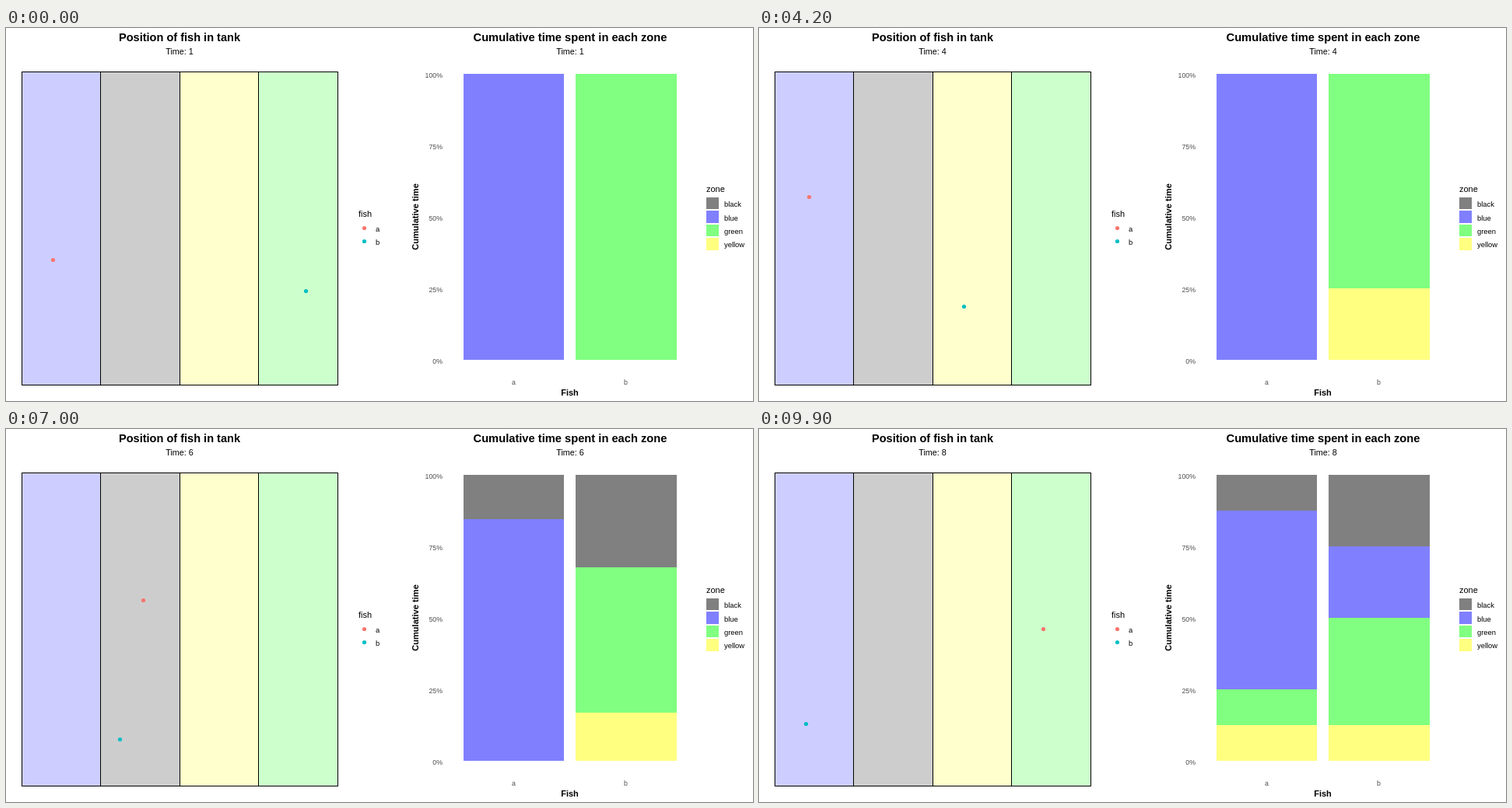
An HTML page for the animation above (10 s loop, 960 px wide and 480 px high).

```html
<!DOCTYPE html>
<html lang="en">
<head>
<meta charset="utf-8">
<title>Fish in tank</title>
<style>
  html, body { margin: 0; width: 100%; height: 100%; overflow: hidden; background: #fff; }
  svg { display: block; width: 960px; height: 480px; font-family: "Liberation Sans", Arial, sans-serif; }
  rect { shape-rendering: crispEdges; }
</style>
</head>
<body>
<svg id="stage" viewBox="0 0 960 480"></svg>
<script>
const STEP_MS = 100, STEPS = 100, LAST = STEPS - 1;
const svg = document.getElementById("stage");

// Tank coordinates run from 0 to 10 on both axes; one position per second.
const fish = [
  { name: "a", color: "#F8766D", barX: 588, barWidth: 129,
    path: [[1, 4], [1.1, 5], [1.2, 4.5], [1.1, 6], [2, 5], [4, 6], [7, 6], [8.5, 5]] },
  { name: "b", color: "#00BFC4", barX: 732, barWidth: 130,
    path: [[9, 3], [8.5, 2], [9.1, 2], [6, 2.5], [4.5, 1.5], [3, 1.5], [2, 2], [1, 2]] }
];
const tankZones = ["blue", "black", "yellow", "green"];
const stackOrder = ["black", "blue", "green", "yellow"];
const pale = { blue: "#CDCDFF", black: "#CDCDCD", yellow: "#FFFFCD", green: "#CDFFCD" };
const strong = { blue: "#8080FF", black: "#808080", yellow: "#FFFF80", green: "#80FF80" };
const keySteps = fish[0].path.map((_, i, all) => Math.round(LAST * i / (all.length - 1)));

function add(tag, attrs, text = "") {
  const el = document.createElementNS("http://www.w3.org/2000/svg", tag);
  for (const key in attrs) el.setAttribute(key, attrs[key]);
  el.textContent = text;
  return svg.appendChild(el);
}
const label = (text, x, y, size, attrs = {}) =>
  add("text", { x, y, "font-size": size, ...attrs }, text);
const box = (x, y, width, height, fill, attrs = {}) =>
  add("rect", { x, y, width, height, fill, ...attrs });
const dot = (cx, cy, fill) => add("circle", { cx, cy, r: 2.6, fill });

const middle = { "text-anchor": "middle" };
const bold = { ...middle, "font-weight": "bold" };
const axis = { fill: "#4D4D4D" };

// Tank
label("Position of fish in tank", 223, 17, 14.55, bold);
const edges = [20.5, 121.5, 223.5, 324.5, 426.5];
tankZones.forEach((zone, i) =>
  box(edges[i], 56.5, edges[i + 1] - edges[i], 403, pale[zone], { stroke: "#000" }));
label("fish", 453, 243, 11);
fish.forEach((f, i) => {
  dot(460.5, 257.5 + 17 * i, f.color);
  label(f.name, 475, 262 + 17 * i, 9.4);
});

// Chart
label("Cumulative time spent in each zone", 725, 17, 14.7, bold);
for (let i = 0; i <= 4; i++)
  label(`${100 - 25 * i}%`, 561, 64 + 92 * i, 8.8, { ...axis, "text-anchor": "end" });
fish.forEach((f, i) => label(f.name, 652.5 + 144 * i, 459, 8.8, { ...axis, ...middle }));
label("Fish", 724.5, 473, 11, bold);
label("Cumulative time", 0, 0, 11.1, { ...bold, transform: "translate(530 243) rotate(-90)" });
label("zone", 900, 211, 11);
stackOrder.forEach((zone, i) => {
  const y = Math.round(218 + 17.28 * i);
  box(900, y, 16, i % 2 ? 16 : 15, strong[zone]);
  label(zone, 923, Math.round(230.3 + 17.28 * i), 9.4);
});

// Moving parts
const clocks = [223, 725].map(x => label("", x, 34, 10.8, middle));
for (const f of fish) {
  f.dot = dot(0, 0, f.color);
  f.bars = stackOrder.map(zone => box(f.barX, 59, f.barWidth, 0, strong[zone]));
  f.shares = f.path.map((_, i) => {
    const visited = f.path.slice(0, i + 1).map(([x]) => tankZones[Math.floor(x / 2.5)]);
    return stackOrder.map(zone => visited.filter(v => v === zone).length / visited.length);
  });
}

function blend(keys, step) {
  let k = 0;
  while (k < keySteps.length - 2 && step >= keySteps[k + 1]) k++;
  const t = (step - keySteps[k]) / (keySteps[k + 1] - keySteps[k]);
  return keys[k].map((v, i) => v + (keys[k + 1][i] - v) * t);
}

function draw(ms) {
  const step = Math.floor(ms / STEP_MS) % STEPS;
  const text = `Time: ${Math.round(1 + 7 * step / LAST)}`;
  clocks.forEach(clock => { clock.textContent = text; });

  for (const f of fish) {
    const [x, y] = blend(f.path, step);
    f.dot.setAttribute("cx", Math.floor(20.1 + 40.6 * x) + 0.5);
    f.dot.setAttribute("cy", Math.floor(459.7 - 40.35 * y) + 0.5);

    let sum = 0;
    blend(f.shares, step).forEach((share, i) => {
      const top = Math.round(59 + 368 * sum);
      sum += share;
      f.bars[i].setAttribute("y", top);
      f.bars[i].setAttribute("height", Math.round(59 + 368 * sum) - top);
    });
  }
}

const start = performance.now();
function tick() {
  draw(performance.now() - start);
  requestAnimationFrame(tick);
}
draw(0);
requestAnimationFrame(tick);
</script>
</body>
</html>
```
